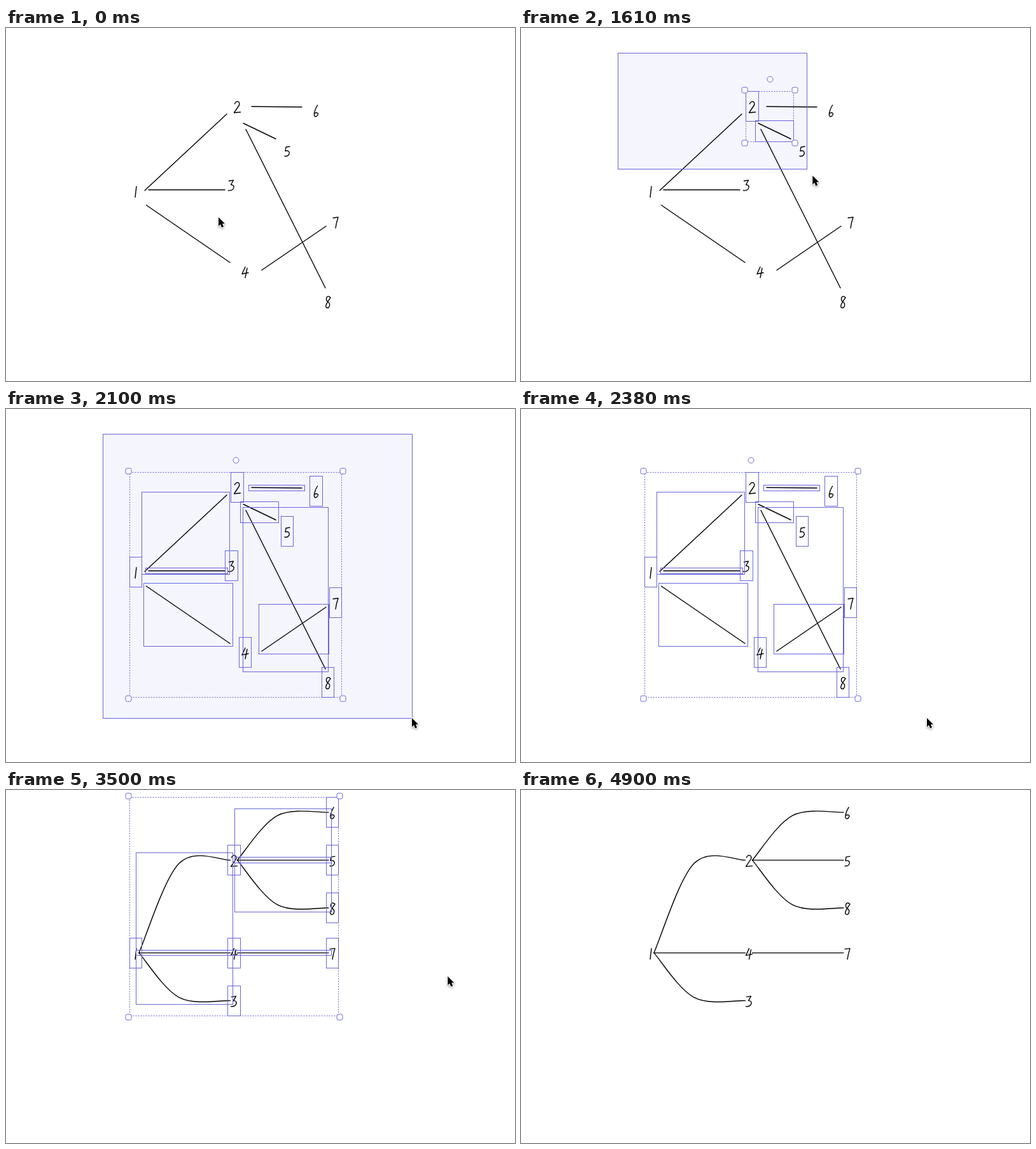
Animation, 800 px wide and 554 px high, one loop 5.11 s. Source, as an HTML page with a canvas:

```html
<!DOCTYPE html>
<html lang="en">
<head>
<meta charset="utf-8">
<title>Graph to tree</title>
<style>
  html, body { margin: 0; width: 100%; height: 100%; overflow: hidden; background: #fff; }
  canvas { display: block; }
</style>
</head>
<body>
<canvas id="stage" width="800" height="554" aria-label="Numbered nodes 1 to 8 being arranged as a tree"></canvas>
<script>
const ctx = document.getElementById('stage').getContext('2d');
const LOOP = 5110, STEP = 70;
const ACCENT = '#6965db';

// Handwritten digits, drawn around the centre of their box
const DIGITS = [
  'M1-7-1 10',
  'M-4-4C-3-9 5-9 3-2L-5 10 5 9',
  'M-4-6 3-7-1 0C7 0 4 10-5 9',
  'M0-7-5 4 5 2M3-5 0 10',
  'M4-6-2-5-3 1C6-2 5 11-4 9',
  'M2-8C-3 0-5 10-1 10S6 1-3 5',
  'M-4-6 4-7Q1 2 0 10',
  'M4-6C-2-12-5-2 0 1S2 12-2 10 0 0 4-6'
].map(d => new Path2D(d));

const ARROW = new Path2D('M0 0V14L3 11 5 16 8 15 6 10H10Z');

// Layout of the finished tree
const COLUMN = 154.5, ROW = 75;

const graph = [], tree = [], spots = [];

// A node with its loose place, its parent, the rows between them, and the loose line
function add(x, y, parent, rows, line) {
  const path = DIGITS[spots.length];
  const from = spots[parent - 1];
  const spot = from ? { x: from.x + COLUMN, y: from.y + rows * ROW } : { x, y };
  spots.push(spot);
  graph.push(node(path, x, y));
  tree.push(node(path, spot.x, spot.y));
  if (!from) return;
  graph.push(link(...line));
  tree.push(link(from.x + 5, from.y, spot.x - 6, spot.y, true));
}

function node(path, x, y) {
  return { path, x, y, box: [x - 9.7, y - 23.5, x + 9.7, y + 23.5] };
}

// Straight, or a smooth curve bending just short of the end's height
function link(x1, y1, x2, y2, curved) {
  const path = new Path2D(), pad = 4.25;
  const w = x2 - x1, h = y2 - y1;
  let peak = y2;
  path.moveTo(x1, y1);
  if (curved && h) {
    const short = 5 * Math.sign(h), mx = x1 + w * 0.44, my = y2 - short;
    path.bezierCurveTo(x1 + (mx - x1) / 6, y1 + (my - y1) / 6, mx - w / 6, my - h / 6, mx, my);
    path.bezierCurveTo(mx + w / 6, my + h / 6, x2 - (x2 - mx) / 6, y2 - short / 6, x2, y2);
    peak += h * 2 / 27 - short * 7 / 9;
  } else {
    path.lineTo(x2, y2);
  }
  return {
    path, x: 0, y: 0,
    box: [Math.min(x1, x2) - pad, Math.min(y1, peak) - pad, Math.max(x1, x2) + pad, Math.max(y1, peak) + pad]
  };
}

add(204, 255.6);
add(363.5, 123, 1, -1.94, [218, 255, 347, 135]);
add(354.5, 246, 1, 1, [224, 254, 344, 254]);
add(376, 382, 1, 0, [220.5, 278, 352, 368]);
add(442, 192, 2, 0, [373, 149.5, 424, 174]);
add(487.5, 129, 2, -1, [386, 123.3, 465, 124]);
add(518, 304, 4, 0, [402, 380, 503, 311]);
add(506, 429, 2, 1, [377, 159, 502, 408]);

// Pointer moves: start, end, x, y, bow of the path
const HOME = [334, 297], CORNER = [152, 39];
const MOVES = [
  [70, 280, 480, 353],
  [420, 980, 162, 48],
  [980, 1190, ...CORNER],
  [1260, 2030, 638, 485, 0.55],
  [2380, 2590, 752, 320],
  [2660, 3360, 702, 300],
  [3360, 3990, 641, 240],
  [4340, 4900, 604, 580]
];

function pointer(t) {
  let [x, y] = HOME;
  for (const [from, to, tx, ty, bow = 1] of MOVES) {
    const p = Math.min(1, Math.max(0, (t - from) / (to - from)));
    const eased = p * p * (3 - 2 * p);
    x += (tx - x) * eased ** bow;
    y += (ty - y) * eased;
  }
  return [x, y];
}

const snap = v => Math.floor(v) + 0.5;

function frame([x1, y1, x2, y2]) {
  ctx.strokeRect(snap(x1), snap(y1), snap(x2) - snap(x1), snap(y2) - snap(y1));
}

function knob(x, y, radius) {
  ctx.beginPath();
  ctx.roundRect(snap(x) - 4.5, snap(y) - 4.5, 9, 9, radius);
  ctx.fill();
  ctx.stroke();
}

function drawSelection(items) {
  if (!items.length) return;
  ctx.strokeStyle = ACCENT;
  ctx.lineWidth = 1;
  items.forEach(item => frame(item.box));

  const [l, t, r, b] = [Math.min, Math.min, Math.max, Math.max]
    .map((pick, i) => pick(...items.map(item => item.box[i])));
  ctx.setLineDash([2, 2]);
  frame([l, t, r, b]);
  ctx.setLineDash([]);

  ctx.fillStyle = '#fff';
  for (const x of [l - 2, r + 2]) for (const y of [t - 2, b + 2]) knob(x, y, 2.5);
  knob((l + r) / 2, t - 19, 4.5);
}

function drawItem({ path, x, y }) {
  ctx.save();
  ctx.translate(x, y);
  ctx.strokeStyle = '#000';
  ctx.lineWidth = 1.4;
  ctx.lineCap = ctx.lineJoin = 'round';
  ctx.stroke(path);
  ctx.restore();
}

function drawMarquee(area) {
  const [x1, y1, x2, y2] = area;
  ctx.fillStyle = 'rgba(0,0,200,.04)';
  ctx.fillRect(x1, y1, x2 - x1, y2 - y1);
  ctx.strokeStyle = ACCENT;
  ctx.lineWidth = 1;
  frame(area);
}

function drawPointer([x, y]) {
  ctx.save();
  ctx.translate(x, y);
  ctx.lineJoin = 'round';
  ctx.lineWidth = 2;
  ctx.strokeStyle = '#fff';
  ctx.shadowColor = 'rgba(0,0,0,.35)';
  ctx.shadowBlur = 3;
  ctx.shadowOffsetY = 1.5;
  ctx.stroke(ARROW);
  ctx.shadowColor = 'transparent';
  ctx.fillStyle = '#000';
  ctx.fill(ARROW);
  ctx.restore();
}

const within = ([l, t, r, b], [x1, y1, x2, y2]) => l > x1 && t > y1 && r < x2 && b < y2;

function draw(t) {
  const items = t < 2520 ? graph : tree;
  const dragging = t >= 1330 && t < 2310;
  let selected = t >= 2310 && t < 3850 ? items : [];

  ctx.fillStyle = '#fff';
  ctx.fillRect(0, 0, 800, 554);
  items.forEach(drawItem);

  if (dragging) {
    const area = [...CORNER, ...pointer(t - 12)];
    drawMarquee(area);
    selected = items.filter(item => within(item.box, area));
  }
  drawSelection(selected);
  if (t < 2660 || t >= 3430) drawPointer(pointer(t));
}

const start = performance.now();
function tick() {
  const t = (performance.now() - start) % LOOP;
  draw(Math.floor(t / STEP) * STEP);
  requestAnimationFrame(tick);
}
tick();
</script>
</body>
</html>
```
